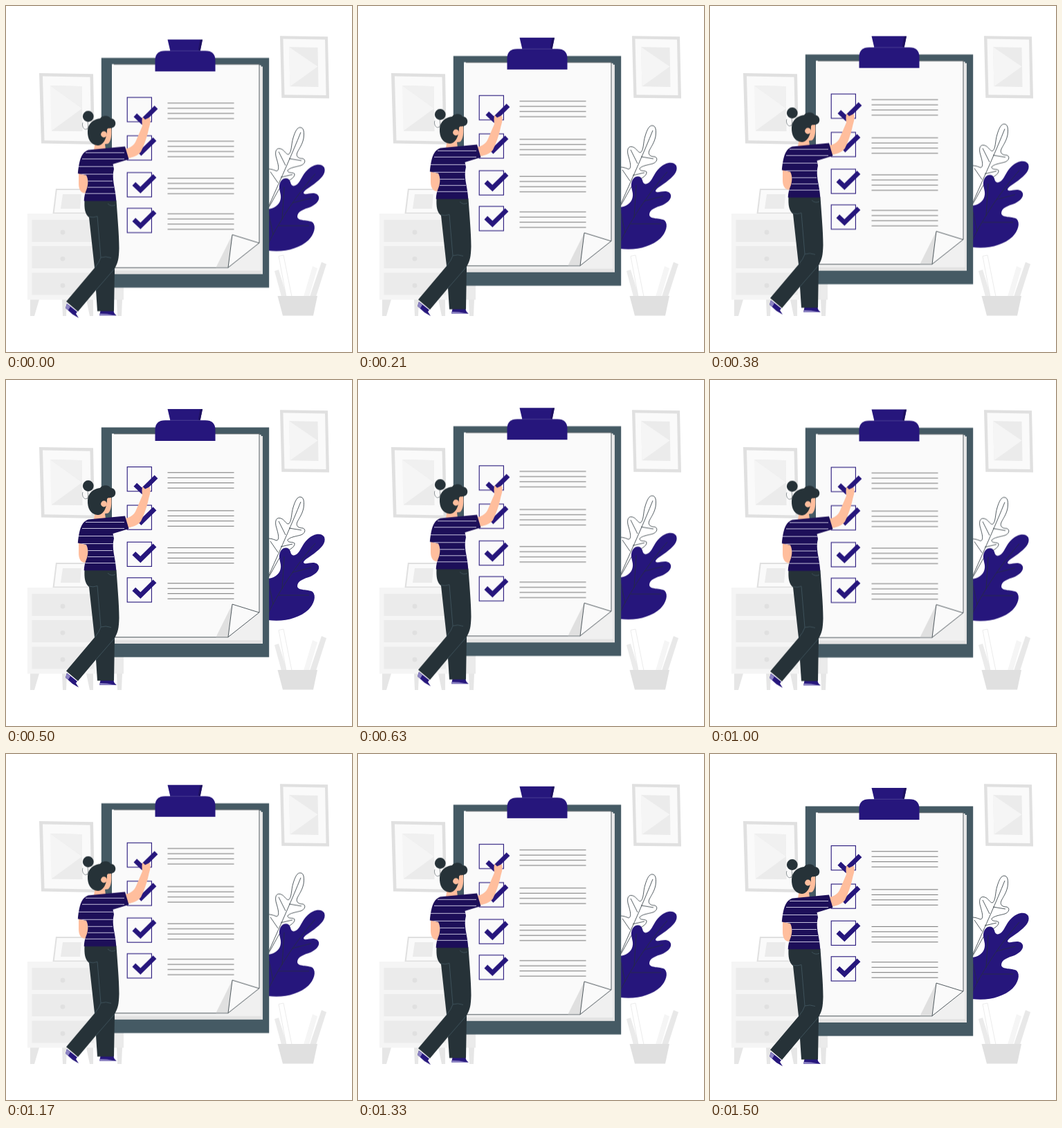
An HTML page for the animation above (1540 ms loop, 500 by 500 pixels).

```html
<!DOCTYPE html>
<html lang="en">
<head>
<meta charset="utf-8">
<title>Checklist</title>
<style>
  html, body { margin: 0; width: 100%; height: 100%; overflow: hidden; background: #fff; }
  svg { display: block; width: 100vw; height: 100vh; }
  .bob { animation: bob 770ms linear -40ms infinite alternate; }
  @keyframes bob { from { transform: translateY(0); } to { transform: translateY(-10px); } }
  .ink { fill: #26167c; }
  .shirt { fill: #1d0f59; }
  .dark { fill: #263238; }
  .skin { fill: #ffbe9d; }
  .g1 { fill: #fafafa; }
  .g2 { fill: #f5f5f5; }
  .g3 { fill: #ebebeb; }
  .g4 { fill: #e0e0e0; }
  .thin { fill: none; stroke: #263238; stroke-width: .8; }
  .seam { fill: none; stroke: #455a64; stroke-width: .8; }
  .rule { stroke: #666; stroke-width: .9; }
  .box { fill: none; stroke: #26167c; stroke-width: 1.1; }
  .tick { fill: none; stroke: #26167c; stroke-width: 6.8; }
</style>
</head>
<body>
<svg viewBox="0 0 500 500">
  <defs>
    <path id="rules" class="rule" d="M233.5 0H329.5M233.5 7.45H329.5M233.5 14.9H329.5M233.5 22.35H329.5"/>
    <rect id="box" class="box" x="175.2" width="35.2" height="35.2"/>
    <path id="tick" class="tick" d="M184.8 16.5L194.3 25.5L215 5"/>
    <path id="shirt" d="M119 208.5C109 212 106 222 103.8 242.5L116 245C119 251 119 257 117 264C114 271 113 276 112.7 282.3H159.3C158.5 264 152 251 156 236L154.5 229L177.5 222L172 203.5Z"/>
    <clipPath id="shirtClip"><use href="#shirt"/></clipPath>
  </defs>

  <!-- pictures on the wall -->
  <path class="g4" d="M48 97L126 98.3L128 200L51 198.5Z"/>
  <path class="g1" d="M53 101.5L121.5 102.8L123.5 195.5L55.5 194.2Z"/>
  <path class="g2" d="M64 115L109.5 116L110.5 181L65.5 180.5Z"/>
  <path class="g3" d="M110 148L110.5 181L65.5 180.5ZM64 115L109.5 116L110 148Z"/>
  <path fill="#f0f0f0" d="M64 115L109.5 116L110 148Z"/>
  <path class="g4" d="M396 43.3L465 44.3L467 133.5L398.3 132.8Z"/>
  <path class="g1" d="M400.5 47.5L461 48.6L462.5 129L402.5 128.2Z"/>
  <path class="g3" d="M409 59.3L450.5 60L451.5 117L410.5 116.3Z"/>
  <path class="g2" d="M409 59.3L450.5 87.5L410.5 116.3Z"/>

  <!-- cabinet -->
  <path class="g4" d="M72 264H126V300H67.5Z"/>
  <path class="g1" d="M73.7 266H126V298.5H69.8Z"/>
  <path class="g3" d="M82 272H109L107 293H79Z"/>
  <path fill="#e6e6e6" d="M35 424H48L41 448H35ZM81 424H88L87 448H82ZM116 424H126V448H121ZM160 424H168L167 448H161Z"/>
  <rect class="g2" x="31" y="300" width="108" height="124.5"/>
  <rect class="g3" x="132" y="300" width="38" height="124.5"/>
  <path class="g3" d="M37.5 309H127V341H37.5ZM37.5 347H127V379H37.5ZM37.5 385.5H127V417.5H37.5Z"/>
  <g class="g4">
    <circle cx="82" cy="327" r="3.4"/><circle cx="82" cy="365.3" r="3.4"/><circle cx="82" cy="404" r="3.4"/>
  </g>

  <!-- pen pot -->
  <path class="g3" d="M388 383L394 381L406 420H398Z"/>
  <path fill="#fff" stroke="#e6e6e6" stroke-width=".8" d="M394 361.5L401 360L413 420H405Z"/>
  <path class="g2" d="M443 376L450 379L438 420H430Z"/>
  <path fill="#e8e8e8" d="M456 370L463 373L448 420H439Z"/>
  <path class="g4" d="M392.5 419H450L444 447.5H400Z"/>

  <g class="bob">
    <!-- leaves -->
    <path class="thin" style="fill:#fff" d="M370 300V240C377 233 386 237 391 239C396 238 393 228 391 221C388 212 390 206 395 206.5C402 207 404 215 408 215C413 213 412 200 415 191C418 181 421 176 425 176C431 176 431 184 430 192C428 201 424 206 421 212C418 219 424 221 429 221C434 223 432 229 426 231C419 233 410 234 407 238C407 243 414 240 417 243C418 249 408 253 400 258C394 264 388 278 380 291Z"/>
    <path class="thin" d="M426 183C414 213 399 246 380 289M409 221L427 224M404 231L394 211M397 248L414 244M393 256L382 240"/>
    <path class="ink" d="M370 296L384 293C393 290 398 283 397 274C396 267 393 261 397 254C401 248 409 248 411 255C412 261 416 262 421 258C427 252 428 244 436 237C444 229 456 227 460 234C463 243 455 250 445 258C437 264 430 267 430 271C433 275 443 268 450 273C456 279 449 287 440 291C431 294 421 297 421 305C422 312 436 309 443 313C449 319 445 331 437 339C424 351 402 357 379 354L370 350Z"/>
    <path class="thin" style="stroke-width:.7" d="M447 243C425 268 400 302 379 344M414 285L441 278M399 309L402 262M394 318L438 318M386 331L380 303"/>

    <!-- clipboard -->
    <rect x="137.8" y="75.5" width="242.4" height="332" fill="#455a64"/>
    <rect x="157" y="88" width="214" height="300" fill="#e3e3e3"/>
    <path fill="#f0f0f0" d="M157 86H368.5V383H157Z"/>
    <path class="g1" d="M153 84.5H366.3V343L321 378.5H153Z"/>
    <path class="thin" d="M156 84.8H366V343M321 378.7H153"/>
    <path class="g4" d="M327 331L303.5 378.3H321Z"/>
    <path class="thin" style="fill:#fafafa" d="M327 331L365.8 343L321 378.5Z"/>
    <path class="ink" d="M233.5 49H284L280.5 66H237.5Z"/>
    <path fill="#1d105f" d="M280.5 49H284L280.5 66H277.5Z"/>
    <path class="ink" d="M215.5 95V79Q215.5 65.2 230 65.2H288Q302.5 65.2 302.5 79V95Z"/>
    <path d="M237.5 65.3H281" stroke="#5b4f9c" stroke-width=".7"/>

    <use href="#rules" y="140.8"/>
    <use href="#rules" y="195.9"/>
    <use href="#rules" y="249.4"/>
    <use href="#rules" y="300.8"/>
    <use href="#box" y="132.6"/>
    <use href="#box" y="188"/>
    <use href="#box" y="241.2"/>
    <use href="#box" y="292.8"/>
    <use href="#tick" x="2" y="141.8"/>
    <path class="tick" d="M193 214.5L215 193"/>
    <use href="#tick" y="241"/>
    <use href="#tick" y="292.8"/>

    <!-- person -->
    <path class="ink" d="M88 430.5L103 442.5L101 445L105 451.3L96 446L86 437ZM136.5 441H155.5C156 445 158 446 160 447.8H135Z"/>
    <path fill="#8d84c4" d="M88 431L93 435L90 440L86 437ZM135.5 445L146 445.5L158 447.8H135Z"/>
    <path class="skin" d="M105 242L116.5 245C119.5 254 120 263 115.5 270.5C108 272 105 265 105 257Z"/>
    <path class="skin" d="M172.5 207C181 205 185.5 201 188 195L197 174C196.500 169 196 164 197.500 161L201 164.500L207.500 161.500C209.500 165 208.500 171 206.500 177C204 190 199 203 195 211C191 217 183 219 176.500 220.500Z"/>
    <path class="skin" d="M140 176H152C153 186 152 196 147.500 199.500L143 200L144 208C139 211 131 211 127 208.500L129 196Z"/>
    <path class="dark" d="M118 181C118 170 128 163.500 136 163C139 158 149 158 151 163C160 163 160.500 175 153.500 176.500C150 178 147.500 176 146 179C146 191 141 202.500 132 202C122 201 117.500 192 118 181Z"/>
    <circle class="dark" cx="118.800" cy="160" r="7.900"/>
    <path class="thin" style="stroke-width:.5" d="M111 169C109 174 113 181 117 178M118 168C119 172 119 176 117 179"/>
    <circle class="skin" cx="141.500" cy="186" r="4.400"/>
    <path class="dark" d="M113.500 281.500H159.500C161 305 163.500 330 163.500 351C163 366 162 371 157 380L156 441.500H132L130 411L104 442L87 427.500L128 379L120 306C114 301 113 293 113.500 281.500Z"/>
    <path class="seam" d="M120 305Q126 307 132 304.500L137 364Q144 361.500 152 364.500M137 364Q135 371 128 379M130 411L157 380M147 286Q152 291 158 288"/>
    <use href="#shirt" class="shirt"/>
    <path clip-path="url(#shirtClip)" stroke="#d9d5ec" stroke-width=".9" d="M115 212.500H171M110 221.500H171M104 232.500H156M104 243.500H156M117 253.500H154M118 262.500H156M113 271.500H159"/>
  </g>
</svg>
</body>
</html>
```
